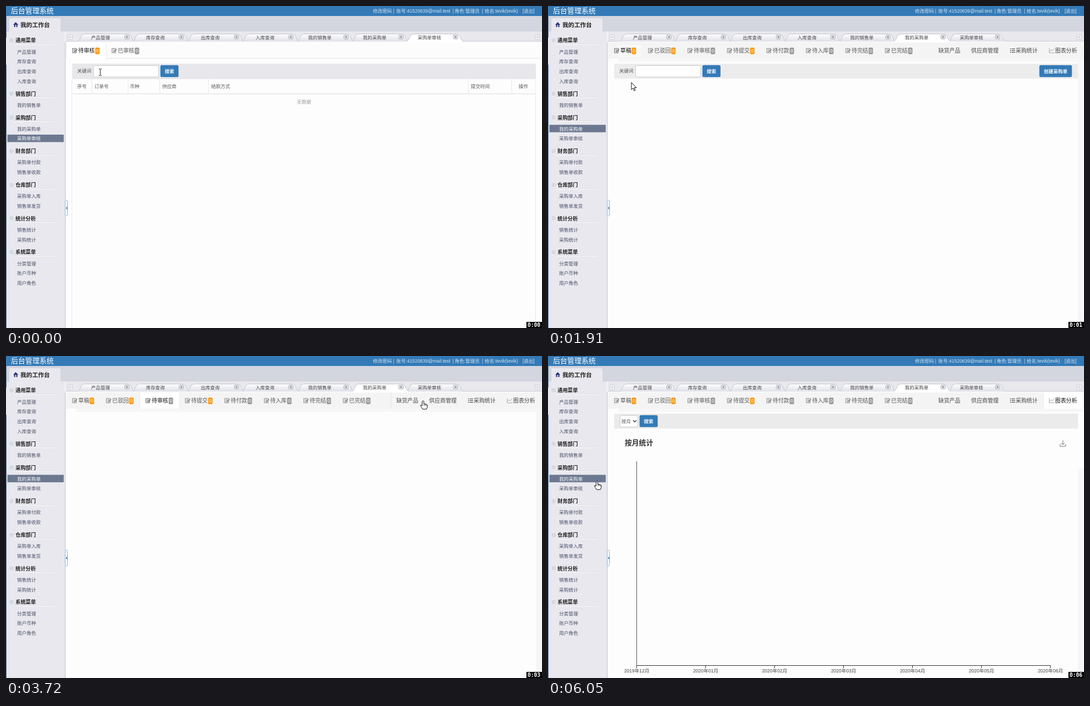
These frames come from a looping animation (964 by 581 pixels, 6150 ms). An HTML page with a canvas:

```html
<!DOCTYPE html>
<html lang="zh-CN">
<head>
<meta charset="utf-8">
<style>
html, body { margin: 0; width: 100%; height: 100%; overflow: hidden; }
canvas { display: block; width: 100vw; height: 100vh; }
</style>
</head>
<body>
<canvas id="stage" width="964" height="581"></canvas>
<script>
const ctx = document.getElementById('stage').getContext('2d');
const LOOP = 6150;
const BLUE = '#337ab7';
const SMALL = 8.47, MEDIUM = 9.88;
const SANS = '"Liberation Sans", "Noto Sans CJK SC", "Noto Sans CJK", sans-serif';

const MENU = [
  ['通用菜单', '产品管理', '库存查询', '出库查询', '入库查询'],
  ['销售部门', '我的销售单'],
  ['采购部门', '我的采购单', '采购单审核'],
  ['财务部门', '采购单付款', '销售单收款'],
  ['仓库部门', '采购单入库', '销售单发货'],
  ['统计分析', '销售统计', '采购统计'],
  ['系统菜单', '分类管理', '账户币种', '用户角色']
];
const PAGES = ['产品管理', '库存查询', '出库查询', '入库查询', '我的销售单', '我的采购单', '采购单审核'];
const STATES = ['草稿', '已驳回', '待审核', '待提交', '待付款', '待入库', '待完结', '已完结'];
const LINKS = [[702, '缺货产品', 692, 751], [761, '供应商管理', 751, 820],
  [841, '采购统计', 820, 891], [912, '图表分析', 891, 962]];

// time, pointer x, pointer y, pointer shape
const POINTER = [
  [0, 169, 119, 'beam'], [210, 171, 117, 'beam'], [420, 196, 92, 'arrow'],
  [640, 212, 80, 'hand'], [850, 211, 81, 'hand'], [1060, 93, 188, 'arrow'],
  [1270, 61, 217, 'hand'], [1490, 60, 219, 'hand'], [1700, 60, 219, 'hand'],
  [1910, 150, 138, 'arrow'], [2130, 215, 80, 'hand'], [2340, 217, 79, 'hand'],
  [2550, 273, 75, 'hand'], [2760, 273, 76, 'hand'], [2980, 276, 77, 'hand'],
  [3190, 380, 82, 'hand'], [3290, 500, 82, 'hand'], [3500, 700, 82, 'hand'],
  [3720, 751, 81, 'hand'], [3930, 772, 80, 'hand'], [4140, 785, 79, 'hand'],
  [4350, 795, 79, 'hand'], [4560, 852, 79, 'hand'], [4670, 858, 79, 'hand'],
  [4880, 926, 80, 'hand'], [5090, 926, 80, 'hand'], [5310, 918, 92, 'arrow'],
  [5530, 690, 140, 'arrow'], [5740, 370, 195, 'arrow'], [5950, 122, 224, 'arrow'],
  [6050, 89, 226, 'hand']
];
// start time, view, whether the list has loaded
const VIEWS = [[0, 'pending', 1], [640, 'approved', 1], [1700, 0, 0], [2340, 1, 0],
  [2550, 1, 1], [2760, 2, 0], [2980, 2, 1], [3720, 2, 'blank'], [3930, 8, 'blank'],
  [4140, 9, 0], [4560, 10, 1], [5310, 11, 1]];

const latest = (list, t) => list.filter(entry => entry[0] <= t).pop();

function rect(x, y, w, h, color) {
  ctx.fillStyle = color;
  ctx.fillRect(x, y, w, h);
}
function text(s, x, y, { size = SMALL, color = '#555', bold = false, align = 'left', font = SANS } = {}) {
  ctx.font = (bold ? 'bold ' : '') + size + 'px ' + font;
  ctx.textAlign = align;
  ctx.fillStyle = color;
  ctx.fillText(s, x, y + size * 0.37);
}
function path(points, fill, stroke, close = true, width = 1) {
  ctx.beginPath();
  for (let i = 0; i < points.length; i += 2) ctx.lineTo(points[i], points[i + 1]);
  if (close) ctx.closePath();
  if (fill) { ctx.fillStyle = fill; ctx.fill(); }
  if (stroke) { ctx.strokeStyle = stroke; ctx.lineWidth = width; ctx.stroke(); }
}
function box(x, y, w, h, fill, stroke, radius = 2) {
  ctx.beginPath();
  ctx.roundRect(x, y, w, h, radius);
  ctx.fillStyle = fill;
  ctx.fill();
  if (stroke) { ctx.strokeStyle = stroke; ctx.lineWidth = 1; ctx.stroke(); }
}
function button(label, x, w) {
  box(x - .3, 106.7, w + .6, 21.6, BLUE, null, 2.5);
  text(label, x + w / 2, 117.5, { color: '#fff', bold: true, align: 'center' });
}
function input(x, w, value = '') {
  box(x + .5, 107.5, w - 1, 20.5, '#fff', '#ccc');
  text(value, x + 7, 118);
}

function header() {
  rect(0, 18, 964, 28, '#d3d5df');
  rect(0, 0, 964, 18, BLUE);
  text('后台管理系统', 9, 8.5, { size: 12.8, color: '#fff' });
  const parts = [[660, '修改密码'], [696, '|'], [702, '账号:41520639@mail.test'], [803, '|'],
    [807, '角色:管理员'], [856, '|'], [861, '姓名:tevik(tevik)'], [929, '[退出]']];
  for (const [x, s] of parts) text(s, x, 8.5, { color: '#d5e4f1' });
}

function sidebar(current, hovered) {
  rect(1, 46, 105, 535, '#e8e8ee');
  rect(106, 65, 1, 516, '#c9cbd6');
  rect(107, 65, 1, 516, '#f2f2f5');
  rect(0, 18, 1, 563, BLUE);
  rect(0, 57, 1, 49, '#e8e8ee');
  box(6, 22, 92, 26, '#e8e8ee', null, [2, 2, 0, 0]);
  path([13, 34, 17.5, 29, 22, 34, 20.5, 34, 20.5, 38, 14.5, 38, 14.5, 34], '#26337d');
  rect(16.5, 34, 2, 4, '#d9dcf0');
  text('我的工作台', 26, 34, { size: 10.6, bold: true, color: '#222' });
  let y = 62;
  for (const [title, ...items] of MENU) {
    box(7.5, Math.round(y) - 2.5, 5, 5, '#f6f6f9', '#b8bac6', 1);
    rect(9, Math.round(y) - .5, 2, 1, '#888');
    text(title, 17, y, { size: 9.2, bold: true, color: '#222' });
    rect(14, Math.round(y + 6), 74, 1, '#dedfe7');
    rect(14, Math.round(y + 7), 74, 1, '#fafafc');
    y += 20.5;
    for (const item of items) {
      const on = item === current;
      if (on) rect(2.6, y - 7.2, 101.2, 13.4, '#6c7890');
      text(item, 20, y, { color: on ? '#fff' : item === hovered ? '#20209a' : '#4c4f68' });
      y += 17.7;
    }
    y += 4.8;
  }
  box(106.5, 350.5, 4, 28, '#fff', '#8fb3d3', 1);
  path([110, 362, 107.5, 364.5, 110, 367], BLUE);
}

function pageTab(i, active) {
  const x = 130 + 98.6 * i, cx = Math.round(x + 86.5);
  ctx.beginPath();
  ctx.moveTo(x - 1, 64);
  ctx.quadraticCurveTo(x + 3, 62, x + 5, 55);
  ctx.quadraticCurveTo(x + 7, 50.5, x + 11, 50.5);
  ctx.lineTo(x + 88, 50.5);
  ctx.quadraticCurveTo(x + 93, 50.5, x + 95, 55);
  ctx.quadraticCurveTo(x + 97, 62, x + 101, 64);
  const shade = ctx.createLinearGradient(0, 50, 0, 64);
  shade.addColorStop(0, '#fff');
  shade.addColorStop(1, active ? '#fff' : '#dfe0e8');
  ctx.fillStyle = shade;
  ctx.fill();
  ctx.strokeStyle = '#c3c5d2';
  ctx.lineWidth = 1;
  ctx.stroke();
  if (active) rect(x, 63, 100, 3, '#fff');
  text(PAGES[i], x + 40, 57, { align: 'center', color: '#444' });
  box(cx - 3.5, 52.5, 8, 7, '#f4f4f7', '#a9acb9', 1);
  path([cx - 1.5, 54, cx + 2.5, 58], null, '#555', false);
  path([cx + 2.5, 54, cx - 1.5, 58], null, '#555', false);
}

function pageTabs(active) {
  rect(107, 46, 857, 19, '#e8e8ed');
  rect(107, 63, 857, 1, '#c9cbd6');
  rect(107, 64, 857, 2, '#f8f8fa');
  for (let i = PAGES.length - 1; i >= 0; i--) if (i !== active) pageTab(i, false);
  pageTab(active, true);
  for (const [x, d] of [[111.5, -1], [951.5, 1]]) {
    box(x, 51.5, 8, 9, '#f1f1f5', '#cccfda', 1);
    path([x + 4 - d, 54, x + 4 + d, 56, x + 4 - d, 58], null, '#aab', false);
  }
}

function stateTab(label, x, orange, active) {
  const color = active ? '#111' : '#555', end = x + 11 + label.length * 10;
  ctx.globalAlpha = active ? 1 : .8;
  box(x + .5, 76.5, 7, 8, '#f4f4f4', '#777', 0);
  for (let y = 78; y < 84; y += 2) rect(x + 2, y, 4, 1, '#888');
  path([x + 4, 83, x + 9, 78], null, '#666', false, 1.5);
  ctx.globalAlpha = 1;
  text(label, x + 11, 80.5, { size: MEDIUM, color });
  box(end + .5, 75, 8, 12, orange ? '#ff9900' : '#999');
  text('0', end + 4.5, 81, { align: 'center', color: '#fff' });
}

function activeCell(left, right) {
  rect(left, 66, right - left, 29, '#fff');
  rect(left, 66, 1, 29, '#eaeaea');
  rect(right, 66, 1, 29, '#eaeaea');
}

function filterRow(color) {
  rect(119, 104, 834, 27, color);
}
function keywordFilter(color) {
  filterRow(color);
  text('关键词', 128, 117);
  input(157, 118);
  button('搜索', 278, 32);
}

function emptyTable(columns, fill, line) {
  rect(119, 131, 834, 28, fill);
  rect(119, 131, 834, 1, line);
  rect(119, 158, 834, 1, '#dedee2');
  columns.forEach(([edge, x, label], i) => {
    if (i) rect(edge, 131, 1, 27, line);
    text(label, x, 144.5);
  });
  rect(118, 131, 1, 450, '#ebebee');
  rect(952, 131, 1, 450, '#ebebee');
  text('无数据', 536, 173, { align: 'center', color: '#999' });
}

const BASE_COLUMNS = [[119, 128, '序号'], [154, 159, '订单号'], [219, 223, '币种']];

function auditPage(view) {
  const pending = view === 'pending';
  const bar = pending ? '#fcfcfc' : '#f4f4f4';
  rect(108, 66, 855, 29, bar);
  rect(108, 94, 855, 1, '#e6e6e8');
  if (pending) activeCell(108, 180); else activeCell(180, 251);
  stateTab('待审核', 119, true, pending);
  stateTab('已审核', 190, false, !pending);
  keywordFilter('#e8e8ec');
  emptyTable([...BASE_COLUMNS, [276, 281, '供应商'], [364, 369, '结款方式'],
    [831, 836, pending ? '提交时间' : '审核时间'], [909, 922, '操作']],
    pending ? '#fdfdfd' : '#f3f3f4', pending ? '#e8e8ea' : '#e9e9eb');
}

function stats() {
  filterRow('#ebebeb');
  text('开始日期', 128, 117);
  input(165, 71, '2020-06-01');
  text('结束日期', 238, 117);
  input(274, 71, '2020-06-30');
  button('搜索', 347, 32);
  text('上月 本月', 382, 117, { color: BLUE });

  const line = '#dcdcdc';
  rect(118, 131, 835, 72, '#f1f1f1');
  for (const y of [131, 154, 178, 202]) rect(118, y, 835, 1, line);
  for (const x of [118, 299, 766, 867, 952]) rect(x, 131, 1, 72, line);
  for (const x of [400, 501, 583, 665]) rect(x, 154, 1, 49, line);
  for (const x of [154, 217]) rect(x, 154, 1, 24, line);
  text('采购员估算', 533, 142, { align: 'center' });
  text('财务实付', 816, 142, { align: 'center' });
  const heads = [[124, '序号'], [159, '单号'], [223, '采购员'], [305, '预算运费'], [406, '预算费用'],
    [507, '折扣'], [589, '产品'], [671, '应付小计'], [772, '实付总计'], [873, '完成日期']];
  heads.forEach(([x, label], i) => {
    text(label, x, 166.5, { bold: true, color: '#444' });
    if (i > 2 && i < 9) text('￥0.00', x, 190);
  });
  text('汇总 :', 124, 190);
}

function chart() {
  filterRow('#ebebeb');
  input(129, 33);
  text('按月', 132, 118);
  path([153, 116, 156, 119, 159, 116], null, '#333', false, 1.4);
  button('搜索', 165, 32);
  text('按月统计', 138, 156.5, { size: 12.8, bold: true, color: '#333' });
  path([921, 159, 921, 163, 931, 163, 931, 159], null, '#777', false);
  path([926, 152, 926, 160], null, '#777', false);
  path([923, 157, 926, 160, 929, 157], null, '#777', false);
  rect(159, 190, 1, 368, '#555');
  rect(159, 558, 745, 1, '#333');
  for (let i = 0; i < 7; i++) {
    const x = Math.round(159 + i * 124);
    rect(x, 558, 1, 5, '#333');
    text(i ? `2020年0${i}月` : '2019年12月', x + .5, 567.5, { align: 'center', color: '#444' });
  }
}

function ordersPage(view, loaded, hoverMissing) {
  rect(108, 66, 855, 29, '#f4f4f4');
  rect(108, 95, 855, 6, '#f7f7f7');
  rect(953, view === 11 ? 203 : 95, 10, 486, '#f6f6f6');
  rect(110, 95, 16, 6, '#fdfdfd');
  if (hoverMissing) rect(692, 66, 1, 29, '#e4e4e4');
  if (view === 0) rect(126, 70, 42, 22, '#f8f8f8');
  else if (view === 1) { rect(169, 66, 1, 29, '#eaeaea'); rect(241, 66, 1, 29, '#eaeaea'); }
  else if (view < 8) activeCell(240, 312);
  else activeCell(LINKS[view - 8][2], LINKS[view - 8][3]);

  STATES.forEach((label, i) => stateTab(label, i ? 109 + 71 * i : 119, [0, 1, 3].includes(i), i === view));
  LINKS.forEach(([x, label], i) => text(label, x, 80.5,
    { size: MEDIUM, color: i + 8 === view ? '#111' : '#444' }));
  for (let y = 77; y < 85; y += 3) { rect(831, y, 2, 1, '#333'); rect(834, y, 6, 1, '#333'); }
  path([901.5, 76, 901.5, 84.5, 911, 84.5], null, '#aaa', false);
  path([902, 82, 905, 79, 907, 81, 910, 77], null, '#aaa', false);

  if (view === 10) return stats();
  if (view === 11) return chart();
  if (loaded === 'blank') return;
  keywordFilter('#ececec');
  if (view === 0) button('创建采购单', 884, 58);
  if (loaded) emptyTable([...BASE_COLUMNS, [276, 281, '标题'], [714, 718, '供应商'],
    [803, 807, view === 1 ? '驳回时间' : '提交时间'], [881, 908, '操作']], '#f2f2f2', '#efefef');
}

function pointer(x, y, shape, pressed) {
  if (pressed) {
    ctx.beginPath();
    ctx.arc(x, y + 2, 7, 0, Math.PI * 2);
    ctx.strokeStyle = '#333';
    ctx.lineWidth = 1;
    ctx.stroke();
  }
  ctx.save();
  ctx.translate(x, y);
  if (shape === 'beam') {
    rect(0, -5, 1, 11, '#222');
    for (const dy of [-6, 6]) { rect(-2, dy, 2, 1, '#222'); rect(1, dy, 2, 1, '#222'); }
  } else if (shape === 'arrow') {
    path([0, 0, 0, 13, 3, 10, 5, 15, 7, 14, 5, 9.5, 9, 9.5], '#fff', '#111');
  } else {
    ctx.lineJoin = 'round';
    path([-2.5, 1, -1, -.5, .5, 1, .5, 5.5, 3, 5.5, 5.5, 6.5, 7, 8, 6.5, 12, 5, 15, -1.5, 15,
      -4.5, 10.5, -5.5, 8, -4, 7.5, -2.5, 9], '#fff', '#111');
    for (const dx of [.5, 2.7, 4.8]) rect(dx, 6, .8, 3, '#333');
  }
  ctx.restore();
}

function draw(t) {
  const [, view, loaded] = latest(VIEWS, t);
  const [, x, y, shape] = latest(POINTER, t);
  const audit = typeof view === 'string';
  const onMenu = t >= 1270 && t < 1700;
  rect(0, 0, 964, 581, '#fdfdfd');
  header();
  sidebar(audit ? '采购单审核' : '我的采购单', onMenu && '我的采购单');
  pageTabs(audit ? 6 : 5);
  if (audit) auditPage(view);
  else ordersPage(view, loaded, t >= 3500 && t < 3930);
  pointer(x, y, shape, t >= 1490 && t < 1700);
  rect(936, 570, 28, 11, '#000');
  text('0:0' + Math.floor(t * 1.03 / 1000), 949.5, 575.5, {
    size: 9.6, bold: true, color: '#fff', align: 'center', font: '"DejaVu Sans Mono", monospace'
  });
}

const start = performance.now();
function tick() {
  draw((performance.now() - start) % LOOP);
  requestAnimationFrame(tick);
}
tick();
</script>
</body>
</html>
```
